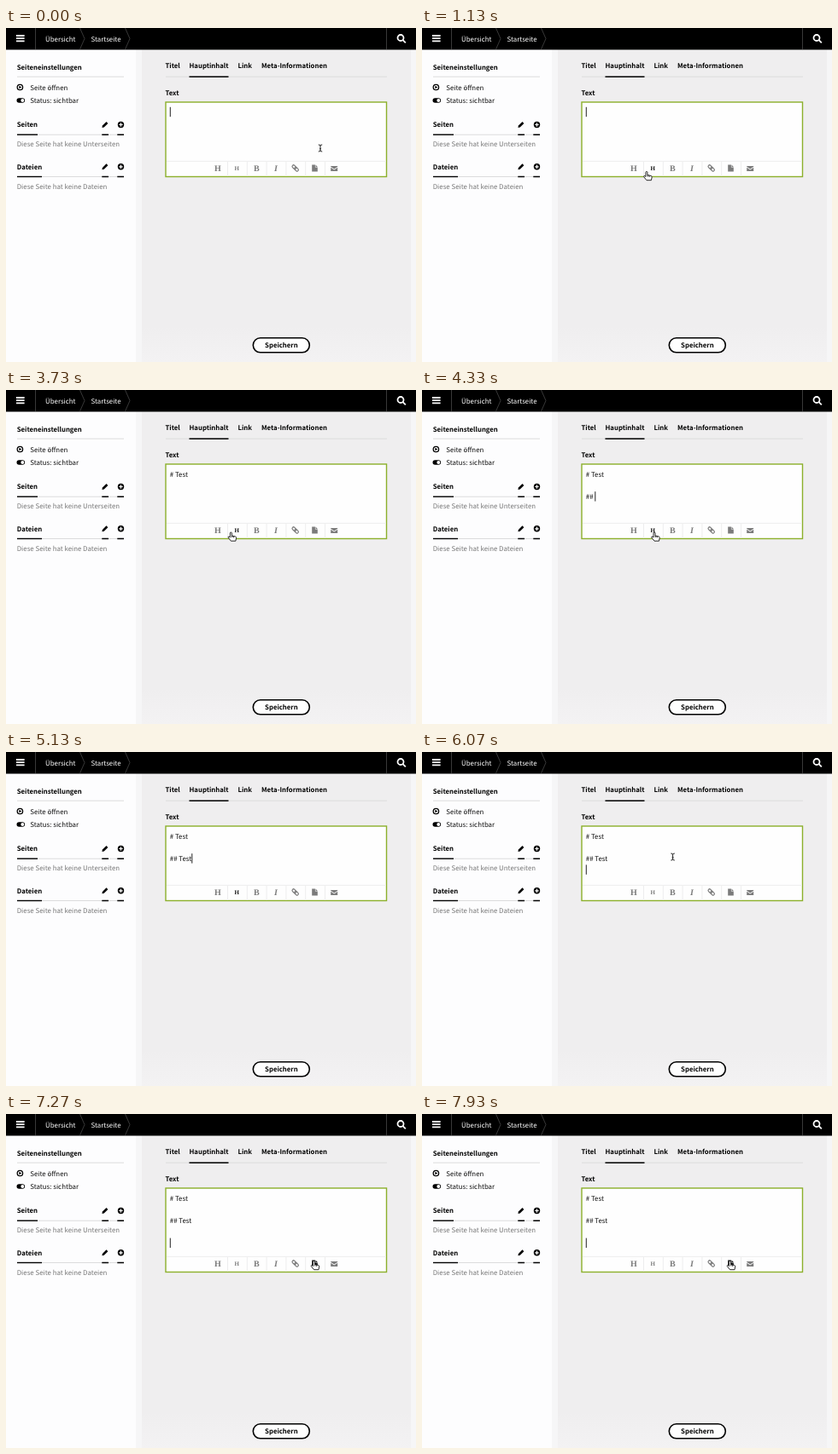
Animation, 480 px wide and 392 px high, one loop 8 s. Source, as an HTML page:

```html
<!DOCTYPE html>
<html lang="de">
<head>
<meta charset="utf-8">
<title>Editor</title>
<style>
html, body { margin: 0; width: 100%; height: 100%; overflow: hidden; background: #efeeef; }
svg { display: block; width: 100%; height: 100%; }
text {
  font: 7.88px "Noto Sans CJK JP", "Noto Sans CJK SC", "Noto Sans CJK", Lato, sans-serif;
  text-rendering: geometricPrecision; white-space: pre; fill: #111;
}
.bold { font-weight: 700; font-size: 7.75px; fill: #000; }
.crumb { font-weight: 500; fill: #fff; }
.hint { fill: #777; }
.rule { stroke: #dcdcdc; }
.mark { stroke: #000; stroke-width: 1.4; }
.tool { fill: #7b7b7b; stroke: #7b7b7b; }
.tool.hover { fill: #111; stroke: #111; }
.tool text { font: 700 10px "Liberation Serif", serif; fill: inherit; stroke: none; text-anchor: middle; }
.tool .small { font-size: 7px; }
.tool .italic { font-style: italic; }
.line { fill: none; }
</style>
</head>
<body>
<svg viewBox="0 0 480 392">
  <defs>
    <linearGradient id="fade" x2="0" y2="1">
      <stop stop-color="#f3f2f3" stop-opacity="0"/>
      <stop offset="1" stop-color="#f3f2f3"/>
    </linearGradient>
    <g id="edit">
      <path d="M112.4 117l.5-2.4 4.6-4.6 1.9 1.9-4.6 4.6z"/>
      <circle cx="134.5" cy="113.5" r="3.7"/>
      <path d="M132.3 113.5h4.4M134.5 111.3v4.4" stroke="#fff" stroke-width="1.2"/>
      <path class="rule" d="M13 125.2H138"/>
      <path class="mark" d="M112.3 125.2h7.7M130.3 125.2h7.7"/>
    </g>
  </defs>

  <rect width="480" height="392" fill="#efeeef"/>
  <rect y="25" width="152" height="367" fill="#fdfdfe"/>
  <path d="M152 25h7v367h-7zM474 25h6v367h-6z" fill="#f6f6f7"/>
  <rect x="159" y="350" width="315" height="42" fill="url(#fade)"/>

  <rect width="480" height="25.5"/>
  <path class="line" d="M34.5 0V25M445.5 0V25M86.5 0L92 12.5 86.5 25M139.5 0L145 12.5 139.5 25" stroke="#383838"/>
  <path d="M12 9h9.6M12 12.2h9.6M12 15.4h9.6" stroke="#fff" stroke-width="1.8"/>
  <g class="line" stroke="#fff" stroke-width="1.8">
    <circle cx="462" cy="11.5" r="3.5"/>
    <path d="M464.6 14.2l3.2 3.2"/>
  </g>
  <text class="crumb" x="46" y="15.8">Übersicht</text>
  <text class="crumb" x="99.5" y="15.8">Startseite</text>

  <text class="bold" x="12.7" y="48.7">Seiteneinstellungen</text>
  <path class="rule" d="M13 57.2H138"/>
  <circle class="line" cx="16.4" cy="69.5" r="3.2" stroke="#000" stroke-width="1.3"/>
  <path d="M15.3 67.7l3 1.8-3 1.8z"/>
  <text x="28.3" y="72.8">Seite öffnen</text>
  <rect x="12.5" y="82.2" width="9.6" height="5.6" rx="2.8"/>
  <circle cx="19.3" cy="85" r="2" fill="#fff"/>
  <text x="28.3" y="88.4">Status: sichtbar</text>

  <use href="#edit"/>
  <text class="bold" x="12.7" y="116.4">Seiten</text>
  <path class="mark" d="M13 125.2h24"/>
  <text class="hint" x="12.7" y="139.4">Diese Seite hat keine Unterseiten</text>

  <use href="#edit" y="49.3"/>
  <text class="bold" x="12.7" y="165.8">Dateien</text>
  <path class="mark" d="M13 174.5h29"/>
  <text class="hint" x="12.7" y="188.9">Diese Seite hat keine Dateien</text>

  <text class="bold" x="186.5" y="47.4">Titel</text>
  <text class="bold" x="214.5" y="47.4">Hauptinhalt</text>
  <text class="bold" x="271.5" y="47.4">Link</text>
  <text class="bold" x="299" y="47.4">Meta-Informationen</text>
  <path class="rule" d="M187 57.2H446"/>
  <path class="mark" d="M214.5 57.2h46"/>
  <text class="bold" x="186.5" y="78.6">Text</text>

  <rect id="box" x="187" y="87" width="258.5" height="87.5" fill="#fefefe" stroke="#8cb02b" stroke-width="1.4"/>
  <g id="lines">
    <text x="191.8" y="101.6"></text>
    <text x="191.8" y="114.8"></text>
    <text x="191.8" y="128.2"></text>
    <text x="191.8" y="141.4"></text>
    <text x="191.8" y="154.6"></text>
  </g>
  <path id="caret" d="M.5 0v11.4" stroke="#222"/>

  <g id="toolbar">
    <path d="M188 156.4H445M259.5 157v17M282.3 157v17M305.1 157v17M327.9 157v17M350.7 157v17M373.5 157v17" stroke="#ededee"/>
    <g class="tool"><text x="248" y="167.8">H</text></g>
    <g class="tool"><text class="small" x="270.3" y="167">H</text></g>
    <g class="tool"><text x="293.3" y="167.8">B</text></g>
    <g class="tool"><text class="italic" x="316" y="167.8">I</text></g>
    <g class="tool">
      <g class="line" transform="rotate(45 338.7 164.5)" stroke-width="1.2">
        <rect x="334.2" y="162.9" width="5.2" height="3.2" rx="1.6"/>
        <rect x="338" y="162.9" width="5.2" height="3.2" rx="1.6"/>
      </g>
    </g>
    <g class="tool" stroke-width="0">
      <path d="M358.2 160.6h3.7v2.9h2.9v5h-6.6zM362.5 160.6l2.3 2.3h-2.3z"/>
    </g>
    <g class="tool" stroke-width="0">
      <path d="M380.2 161.9h8v.9l-4 2.7-4-2.7zM380.2 163.8l4 2.7 4-2.7v4.2h-8z"/>
    </g>
  </g>

  <rect x="289.3" y="363.8" width="66" height="17" rx="8.5" fill="#fefefe" stroke="#000" stroke-width="1.6"/>
  <text class="bold" x="322.4" y="375.2" text-anchor="middle">Speichern</text>

  <g id="pointer">
    <path id="beam" class="line" d="M-2.2-4Q0-4 0-2.8Q0-4 2.2-4M0-3V3M-2.2 4Q0 4 0 2.8Q0 4 2.2 4M-1 .8h2" stroke="#222"/>
    <path id="hand" d="M-1 1a1 1 0 0 1 2 0v3l4.3 1q1.1.4.9 1.6l-.7 3.6H0l-3.2-4q-.3-1.4 1-1.2L-1 6z M1.2 4v2M3.2 4.6v1.8" fill="#fff" stroke="#111" stroke-width=".9" stroke-linejoin="round"/>
  </g>
</svg>
<script>
const LOOP = 8000, GROW_AT = 6200, GROWTH = 11;
const LINE = 13.2, TOOL_LEFT = 236.7, TOOL_WIDTH = 22.8, TOOL_TOP = 156;
const $ = id => document.getElementById(id);
const lines = [...$('lines').children];
const tools = [...document.querySelectorAll('.tool')];

// [time, text]; every entry also restarts the caret blink
const edits = [
  [0, ''], [1700, '# '],
  [2400, '# T'], [2530, '# Te'], [2730, '# Tes'], [2870, '# Test'],
  [3070, '# Test\n'], [3200, '# Test\n\n'], [4130, '# Test\n\n## '],
  [4730, '# Test\n\n## T'], [4870, '# Test\n\n## Te'],
  [5000, '# Test\n\n## Tes'], [5130, '# Test\n\n## Test'],
  [5930, '# Test\n\n## Test\n'], [6130, '# Test\n\n## Test\n\n'],
  [7500, '# Test\n\n## Test\n\n']
];

// [time, x, y] of the pointer's hot spot
const path = [
  [0, 368, 141], [500, 368, 141], [930, 345, 153], [1130, 263, 168.5],
  [1330, 249, 167], [3450, 249, 167], [3900, 272, 167], [5600, 272, 167],
  [6070, 293.5, 123], [6670, 353.5, 157], [7100, 360.5, 172.5], [LOOP, 360.5, 172.5]
];
const typing = [[2400, 3400], [4730, 5600]];

function pointerAt(t) {
  const i = path.findIndex(p => p[0] > t);
  const [t0, x0, y0] = path[i - 1], [t1, x1, y1] = path[i];
  const k = (t - t0) / (t1 - t0);
  return [x0 + (x1 - x0) * k, y0 + (y1 - y0) * k];
}

const show = (node, on) => node.setAttribute('visibility', on ? 'visible' : 'hidden');
const move = (node, x, y) => node.setAttribute('transform', `translate(${x} ${y})`);

function drawText(t) {
  const [since, text] = edits.filter(e => e[0] <= t).pop();
  const rows = text.split('\n'), last = rows.length - 1;
  lines.forEach((line, i) => line.textContent = rows[i] || '');
  const width = rows[last] ? lines[last].getComputedTextLength() : 0;
  move($('caret'), 191.8 + width, 92.8 + last * LINE);
  show($('caret'), (t - since) % 1000 < 500);
}

function drawPointer(t, grown) {
  const [x, y] = pointerAt(t);
  const index = y > TOOL_TOP + grown ? Math.floor((x - TOOL_LEFT) / TOOL_WIDTH) : -1;
  tools.forEach((tool, i) => tool.classList.toggle('hover', i === index));
  const visible = !typing.some(([from, to]) => t >= from && t < to);
  show($('beam'), visible && index < 0);
  show($('hand'), visible && index >= 0);
  move($('pointer'), x, y);
}

function frame(now) {
  const t = now % LOOP, grown = t < GROW_AT ? 0 : GROWTH;
  $('box').setAttribute('height', 87.5 + grown);
  move($('toolbar'), 0, grown);
  drawText(t);
  drawPointer(t, grown);
  requestAnimationFrame(frame);
}
const start = performance.now();
const tick = frame;
requestAnimationFrame(function first(now) { tick(Math.max(0, now - start)); });
</script>
</body>
</html>
```
